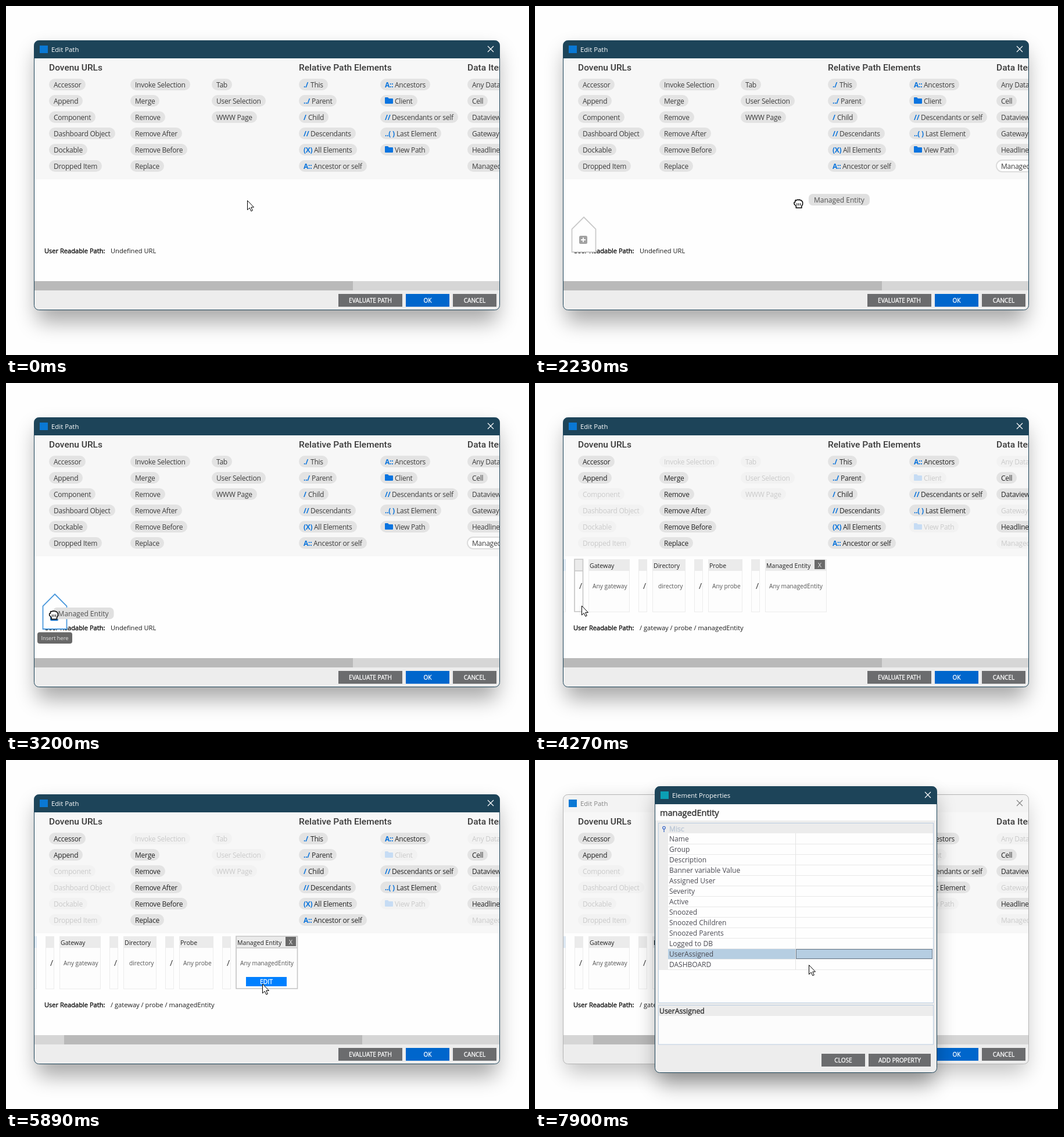
An HTML page for the animation above (8 s loop, 900 by 600 pixels).

```html
<!DOCTYPE html>
<html lang="en">
<head>
<meta charset="utf-8">
<title>Edit Path</title>
<style>
html, body { margin: 0; width: 100%; height: 100%; overflow: hidden; background: #fefefe; }
svg { display: block; }
text { font-family: "Open Sans", "Noto Sans", sans-serif; white-space: pre; }
.head { font-family: Roboto, "Open Sans", sans-serif; font-weight: 500; }
.pill text, .tight { letter-spacing: -.24px; }
.pill rect { fill: #e3e3e3; }
.pill .label { fill: #3c3c3c; }
.pill .sign { fill: #0a74dc; font-weight: 700; }
.pill .folder { fill: #0a74e0; }
.pill.on .label { fill: #242424; }
.pill.off rect { fill: #f2f2f2; }
.pill.off .label { fill: #cacaca; }
.pill.off .folder { fill: #c6dcf4; }
.pill.held rect { fill: #fff; stroke: #dcdcdc; stroke-width: 2; }
</style>
</head>
<body>
<svg id="stage" width="900" height="600" viewBox="0 0 900 600" xmlns="http://www.w3.org/2000/svg">
  <defs>
    <clipPath id="paneClip"><rect x="48.5" y="59.5" width="801" height="463" rx="8"/></clipPath>
    <clipPath id="dialogClip"><rect x="206.5" y="45.5" width="485" height="492" rx="8"/></clipPath>
  </defs>
</svg>
<script>
const NS = "http://www.w3.org/2000/svg";
const stage = document.getElementById("stage");

function add(parent, tag, attrs = {}) {
  const node = document.createElementNS(NS, tag);
  for (const k in attrs) node.setAttribute(k, attrs[k]);
  parent.appendChild(node);
  return node;
}
const group = (parent, attrs) => add(parent, "g", attrs);
const box = (parent, x, y, width, height, fill, extra) =>
  add(parent, "rect", { x, y, width, height, fill, ...extra });
const path = (parent, d, stroke, extra) => add(parent, "path", { d, stroke, fill: "none", ...extra });
function label(parent, x, y, str, size, fill, extra) {
  const node = add(parent, "text", { x, y, "font-size": size, fill, ...extra });
  node.textContent = str;
  return node;
}
const thick = (color, w = .4) => ({ stroke: color, "stroke-width": w });
const show = (node, on) => node.setAttribute("display", on ? "inline" : "none");
const place = (node, [x, y]) => node.setAttribute("transform", `translate(${x.toFixed(2)} ${y.toFixed(2)})`);
const cross = (parent, x, y, color) =>
  path(parent, `M${x - 5} ${y - 5}l10 10m0 -10l-10 10`, color, { "stroke-width": 1.2 });

function button(parent, x, y, w, h, str, fill, size = 10.1) {
  box(parent, x, y, w, h, fill);
  label(parent, x + w / 2, y + h / 2 + 3.8, str, size, "#fff", { "text-anchor": "middle", ...thick("#fff", .3) });
}
function shadow(x, y, w, h, alpha, drop) {
  return box(stage, x + 5, y + drop, w - 10, h, "#000", { rx: 8, opacity: alpha, style: "filter:blur(18px)" });
}

// Main window
const deepShadow = shadow(48, 59, 802, 464, .34, 20);
const softShadow = shadow(48, 59, 802, 464, .24, 14);
const pane = group(stage, { "clip-path": "url(#paneClip)" });
box(pane, 48, 59, 802, 464, "#fefefe");
const titleBar = box(pane, 48, 59, 802, 31, "#1d4459");
box(pane, 58, 68, 14, 13, "#0a78d4");
const title = label(pane, 78, 79, "Edit Path", 11.4, "#fff");
const closer = cross(pane, 834, 74, "#fff");
box(pane, 48, 90, 802, 208, "#f7f7f7");

const heading = (x, str) => label(pane, x, 111, str, 15.5, "#3a3a3a", { class: "head" });
heading(74, "Dovenu URLs");
heading(504, "Relative Path Elements");
heading(794, "Data Items");

// A leading "!" marks a pill that gets disabled; "sign|shift|name" adds a sign before the name
const columns = [
  [74, ["Accessor", "Append", "!Component", "!Dashboard Object", "!Dockable", "!Dropped Item"]],
  [214, ["!Invoke Selection", "Merge", "Remove", "Remove After", "Remove Before", "Replace"]],
  [354, ["!Tab", "!User Selection", "!WWW Page"]],
  [504, ["./|20|This", "../|22|Parent", "/|16|Child", "//|20|Descendants", "(X)|26|All Elements", "A::|25|Ancestor or self"]],
  [644, ["A::|25|Ancestors", "!folder|25|Client", "//|20|Descendants or self", "..( )|28|Last Element", "!folder|25|View Path"]],
  [794, ["!Any Data Item", "Cell", "Dataview", "!Gateway", "Headline", "!Managed Entity"]]
];
const pills = [];
function pill(x, y, spec) {
  const off = spec[0] === "!";
  const parts = (off ? spec.slice(1) : spec).split("|");
  const name = parts.pop();
  const shift = parts.length ? +parts[1] : 8;
  const g = group(pane, { class: "pill" });
  const back = box(g, x, y, 60, 20, "#e3e3e3", { rx: 10 });
  if (parts[0] === "folder")
    add(g, "path", { class: "folder", d: `M${x + 8} ${y + 5}q0 -1 1 -1h4l2 2h6q1 0 1 1v7q0 1 -1 1h-12q-1 0 -1 -1z` });
  else if (parts[0]) label(g, x + 8, y + 14.5, parts[0], 12, "#0a74dc", { class: "sign" });
  const text = label(g, x + shift, y + 14.5, name, 12, "#3c3c3c", { class: "label" });
  back.setAttribute("width", Math.round(shift + text.getComputedTextLength() + 8));
  pills.push({ g, off });
}
for (const [x, names] of columns) names.forEach((s, i) => pill(x, 125 + 28 * i, s));
const source = pills[pills.length - 1];

label(pane, 66, 425, "User Readable Path:", 11.1, "#111", thick("#111", .4));
const readable = label(pane, 180, 425, "", 11.15, "#1c1c1c");

// Path cards
const cards = group(pane);
const hovers = [];
function card(x, right, name, value, valueX) {
  const w = right - x;
  box(cards, x + .5, 303.5, w - 1, 90, "#fdfdfd", { stroke: "#ececec" });
  box(cards, x, 303, w, 20, "#ebebeb");
  if (name) label(cards, x + 2, 317.5, name, 10.55, "#222");
  label(cards, valueX, name ? 352.5 : 353.5, value, name ? 10.2 : 14, name ? "#555" : "#333");
  const frame = path(cards, `M${x} 303H${right - .5}V393H${x}ZM${x} 323H${right}`, "#c6c6c6", { "stroke-width": 1.6 });
  hovers.push({ x, right, frame });
}
box(cards, 48, 303, 5, 20, "#dde8f2");
path(cards, "M52.5 323V393.5H48", "#ececec");
for (const x of [68, 178, 274, 372]) card(x, x + 15, "", "/", x + 8);
card(92, 163, "Gateway", "Any gateway", 99);
card(202, 259, "Directory", "directory", 212);
card(298, 357, "Probe", "Any probe", 305);
card(396, 502, "Managed Entity", "Any managedEntity", 403);
box(cards, 481, 304, 18, 16, "#6a6a6a");
label(cards, 490, 316.5, "X", 11, "#e8e8e8", { "text-anchor": "middle" });
const edit = group(cards);
button(edit, 413, 373, 70, 16, "EDIT", "#0080ff", 10.3);

// Drop target
const house = group(pane);
const roof = path(house, "M84 363L104.5 383.5V423H63.5V383.5Z", "#c9c9c9", { "stroke-width": 1.8 });
roof.setAttribute("fill", "#fefefe");
const plusBack = box(house, 76, 395, 14, 14, "#a2a2a2", { rx: 2.5 });
path(house, "M79 402h8m-4 -4v8", "#fff", { "stroke-width": 1.8 });
const tip = group(house);
box(tip, 54, 428.5, 60, 19.5, "#686868", { rx: 4 });
label(tip, 84, 442, "Insert here", 9.3, "#e6e6e6", { "text-anchor": "middle" });

// Scrollbar and footer
box(pane, 48, 473, 802, 16, "#d6d6d6");
const thumb = box(pane, 49, 473, 548, 16, "#b9b9b9");
box(pane, 48, 489, 802, 34, "#ededed");
button(pane, 572, 495, 110, 22, "EVALUATE PATH", "#6b6c6e");
button(pane, 688, 495, 75, 22, "OK", "#0066cc");
button(pane, 769, 495, 75, 22, "CANCEL", "#6b6c6e");
const border = box(stage, 48.5, 59.5, 801, 463, "none", { rx: 8, stroke: "#1d4459" });

// Properties dialog
const dialogShadow = shadow(206, 45, 486, 493, .36, 20);
const dialog = group(stage);
const sheet = group(dialog, { "clip-path": "url(#dialogClip)" });
box(sheet, 206, 45, 486, 493, "#ededed");
box(sheet, 206, 45, 486, 31, "#1d4459");
box(sheet, 216, 54, 14, 13, "#0b9fb5");
label(sheet, 236, 65, "Element Properties", 11.25, "#fff");
cross(sheet, 676, 60, "#fff");
box(sheet, 206, 76, 486, 28, "#fefefe");
label(sheet, 215, 95.5, "managedEntity", 14.5, "#333", thick("#333", .45));
box(sheet, 212.5, 108.5, 473, 309, "#fefefe", { stroke: "#b9cce0" });
box(sheet, 213, 109, 472, 17, "#ececec");
box(sheet, 213, 126, 16, 235, "#ececec");
add(sheet, "circle", { cx: 222, cy: 116.5, r: 2.2, fill: "#fff", stroke: "#3d69c4", "stroke-width": 1.3 });
path(sheet, "M222 119v5", "#3d69c4", { "stroke-width": 1.3 });
label(sheet, 231, 123, "Misc", 12.2, "#bcc8d6", thick("#bcc8d6"));
const picked = group(sheet);
const rows = ["Name", "Group", "Description", "Banner variable Value", "Assigned User", "Severity", "Active",
  "Snoozed", "Snoozed Children", "Snoozed Parents", "Logged to DB", "UserAssigned", "DASHBOARD"];
rows.forEach((name, i) => {
  path(sheet, `M229 ${144.5 + 18 * i}H685`, "#e8e8e8");
  label(sheet, 231, 140 + 18 * i, name, 12, "#4a4a52");
});
path(sheet, "M448.5 126V361", "#e4e4e4");
box(picked, 229, 325, 219, 17, "#b6cee2");
box(picked, 449.5, 325.5, 234, 16, "#b6cee2", { stroke: "#66788a" });
box(sheet, 212.5, 421.5, 473, 67.5, "#fcfcfc", { stroke: "#b9cce0" });
box(sheet, 213, 422, 472, 18, "#ececec");
const noteName = label(sheet, 214, 436, "", 12.25, "#333", thick("#333"));
const noteText = label(sheet, 214, 452, "(Description)", 11.1, "#4a4a52");
button(sheet, 493, 505, 75, 22, "CLOSE", "#6b6c6e");
button(sheet, 574, 505, 107, 22, "ADD PROPERTY", "#6b6c6e");
box(dialog, 206.5, 45.5, 485, 492, "none", { rx: 8, stroke: "#1d4459" });

// Dragged chip and pointers
const chip = group(stage);
box(chip, 0, 0, 105, 20, "#e0e0e0", { rx: 7 });
label(chip, 9, 14.8, "Managed Entity", 12, "#505050");
const arrow = group(stage);
path(arrow, "M.5 .5V16.5L4.2 13L6.8 18.7L9.3 17.6L6.8 12H11.5Z", "#000", { style: "fill:#fff" });
const hand = group(stage);
path(hand, "M-4 7V4L-7.3 .5V-2.5L-5.5 -3V-5.5Q-4.5 -7 -3 -6Q-1.5 -8 .5 -6.5Q2 -7.5 3.5 -6Q5.5 -6.5 6 -4.5L7.3 -3V1L5.5 4V7Z",
  "#000", { style: "fill:#fff", "stroke-width": 1.5 });
path(hand, "M-2.5 -1V3M.5 -1V3M3.5 -1V3", "#000", { "stroke-width": 1.1 });

// Motion
const ease = p => p * p * (3 - 2 * p);
const mix = (a, b, p) => a + (b - a) * p;
const line = (x0, y0, x1, y1, p) => [mix(x0, x1, p), mix(y0, y1, p)];
const bend = (a, b, c, p) => a * (1 - p) ** 2 + 2 * b * p * (1 - p) + c * p * p;

function approach(p) {
  const x = p < .6 ? 43 + 267 * (1 - p / .6) ** 2 : mix(43, 82, ease((p - .6) / .4));
  return [x, mix(374, 399, 1 - (1 - p) ** 2)];
}
// start, end, number of steps, position
const moves = [
  [0, 0, 1, () => [415, 334]],
  [580, 1350, 12, p => line(415, 334, 817, 275.5, ease(p))],
  [1420, 1420, 1, () => [829, 286]],
  [1620, 2370, 11, p => [829 - 519 * p ** 1.61, 286 + 88 * p ** 2.43]],
  [2440, 3200, 11, approach],
  [3270, 3340, 2, p => line(82, 399, 88, 400, Math.min(1, p * 1.5))],
  [3670, 3670, 1, () => [84, 387]],
  [4270, 4830, 9, p => line(80, 382.5, 445, 341, ease((9 * p - 1) / 8))],
  [5490, 5570, 2, p => line(445, 341, 436, 388, p)],
  [5830, 5890, 2, p => line(436, 388, 441, 384.5, p)],
  [6680, 7420, 11, p => { const q = ease(p); return [bend(441, 383, 475, q), bend(384, 358, 342, q)]; }],
  [7760, 7900, 3, p => line(475, 342, 471, 352, p)]
];
function pointer(t) {
  const [start, end, n, at] = moves.filter(m => m[0] <= t).pop();
  const k = end > start ? Math.min(n - 1, Math.floor((t - start) / (end - start) * (n - 1) + .01)) : 0;
  const p = (k + 1) / n;
  return { pos: at(p), late: at(Math.max(0, p - .28 / n)) };
}

function draw(t) {
  const { pos, late } = pointer(t);
  const gripping = t >= 1420 && t < 3670;
  const dragging = t >= 1620 && t < 3670;
  const built = t >= 3670;
  const modal = t >= 6350;

  show(arrow, !gripping);
  show(hand, gripping);
  place(gripping ? hand : arrow, pos);
  show(chip, dragging);
  place(chip, [late[0] - 1, late[1] - 13]);

  const over = dragging && pos[0] < 106;
  show(house, dragging);
  show(tip, over);
  roof.setAttribute("stroke", over ? "#4a98dc" : "#c9c9c9");
  plusBack.setAttribute("fill", over ? "#2f80cc" : "#a2a2a2");

  for (const { g, off } of pills) g.setAttribute("class", "pill" + (built ? off ? " off" : " on" : ""));
  if (dragging) source.g.setAttribute("class", "pill held");

  readable.textContent = built ? "/ gateway / probe / managedEntity" : "Undefined URL";
  show(cards, built);
  let last = false;
  for (const h of hovers) {
    last = !modal && pos[0] >= h.x && pos[0] <= h.right && pos[1] < 394;
    show(h.frame, last);
  }
  show(edit, last);
  const scrolled = t >= 5160;
  thumb.setAttribute("x", scrolled ? 100 : 49);
  thumb.setAttribute("width", scrolled ? 513 : 548);

  titleBar.setAttribute("fill", modal ? "#f3f3f3" : "#1d4459");
  title.setAttribute("fill", modal ? "#858585" : "#fff");
  closer.setAttribute("stroke", modal ? "#858585" : "#fff");
  border.setAttribute("stroke", modal ? "#b4b4b4" : "#1d4459");
  show(deepShadow, !modal);
  show(softShadow, modal);
  show(dialogShadow, modal);
  show(dialog, modal);
  show(picked, t >= 7490);
  noteName.textContent = t >= 7570 ? "UserAssigned" : "(Name)";
  show(noteText, t < 7570);
}

const begin = performance.now();
function tick() {
  draw((performance.now() - begin) % 8000);
  requestAnimationFrame(tick);
}
tick();
</script>
</body>
</html>
```
